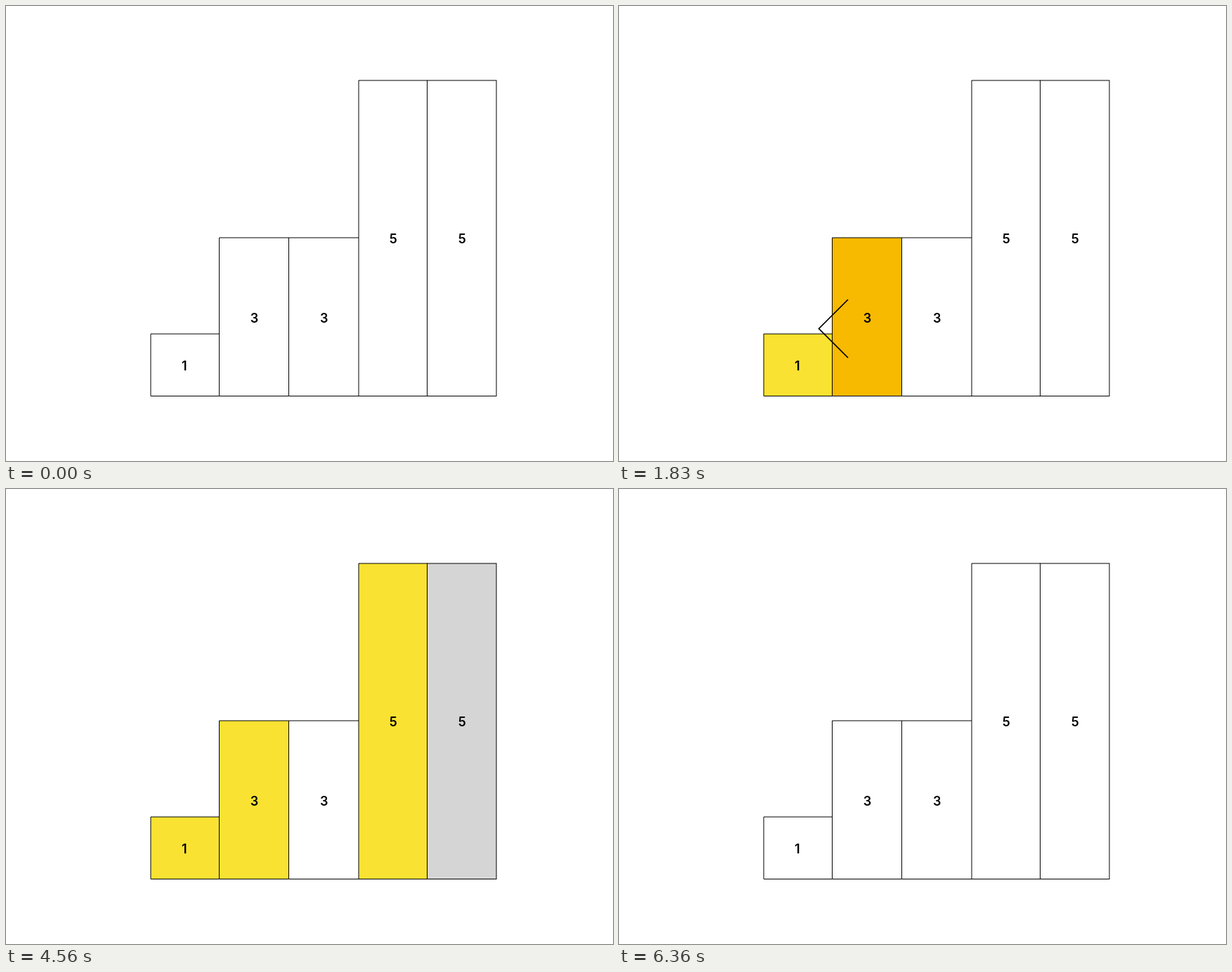
An HTML page for the animation above (6390 ms loop, 864x648 px).

```html
<!DOCTYPE html>
<html lang="en">
<head>
<meta charset="utf-8">
<title>Unique bars</title>
<style>
  html, body { margin: 0; width: 100%; height: 100%; overflow: hidden; background: #fff; }
  svg { display: block; width: 100vw; height: 100vh; }
  rect { stroke: #000; stroke-width: 1; }
  text { font: 600 18px Inter, "Liberation Sans", sans-serif; text-anchor: middle; }
  #arrow { fill: none; stroke: #000; stroke-width: 1.7; }
</style>
</head>
<body>
<svg id="stage" viewBox="0 0 864 648"></svg>
<script>
const LOOP = 6390;
const BASE = 555.5;
const COLORS = { w: '#ffffff', y: '#fae232', o: '#f8ba00', g: '#d5d5d5' };
const EDGES = [206, 303.5, 402.5, 502, 599.5, 698];
const VALUES = [1, 3, 3, 5, 5];

// Per value: top of the bar, label baseline and label shift from the middle.
const SHAPES = {
  1: { top: 467, y: 518.5, dx: -0.9 },
  3: { top: 330, y: 451, dx: 0.5 },
  5: { top: 106, y: 338.3, dx: 0.5 }
};

// One letter per bar; arrow is the tip of the "<" sign.
const STEPS = [
  { at: 0, bars: 'wwwww' },
  { at: 930, bars: 'ywwww' },
  { at: 1830, bars: 'yowww', arrow: [284.5, 459.5] },
  { at: 2730, bars: 'yygww' },
  { at: 3630, bars: 'yywow', arrow: [424.5, 324] },
  { at: 4560, bars: 'yywyg' },
  { at: 5460, bars: 'yywyw' },
  { at: 6360, bars: 'wwwww' }
];

const stage = document.getElementById('stage');

function add(tag, attrs, text = '') {
  const el = document.createElementNS('http://www.w3.org/2000/svg', tag);
  for (const key in attrs) el.setAttribute(key, attrs[key]);
  el.textContent = text;
  return stage.appendChild(el);
}

const bars = VALUES.map((v, i) => add('rect', {
  x: EDGES[i], y: SHAPES[v].top,
  width: EDGES[i + 1] - EDGES[i], height: BASE - SHAPES[v].top
}));
VALUES.forEach((v, i) => add('text', {
  x: (EDGES[i] + EDGES[i + 1]) / 2 + SHAPES[v].dx, y: SHAPES[v].y
}, v));
const arrow = add('path', { id: 'arrow', d: 'M41.5-41.5L0 0L41.5 41.5' });

// Shared edges would darken where they fall between pixels, so each
// bar leaves its right edge to the taller neighbour that starts there.
bars.slice(0, -1).forEach((bar, i) => {
  const w = EDGES[i + 1] - EDGES[i];
  const h = BASE - SHAPES[VALUES[i]].top;
  bar.setAttribute('stroke-dasharray', `${w} ${h} ${w + h}`);
  bar.setAttribute('stroke-dashoffset', 0);
});

function draw(time) {
  const t = time % LOOP;
  const step = STEPS.filter(s => s.at <= t).pop();
  bars.forEach((bar, i) => bar.setAttribute('fill', COLORS[step.bars[i]]));
  arrow.setAttribute('visibility', step.arrow ? 'visible' : 'hidden');
  if (step.arrow) arrow.setAttribute('transform', `translate(${step.arrow})`);
}

const start = performance.now();
function tick() {
  draw(Math.max(0, performance.now() - start));
  requestAnimationFrame(tick);
}
tick();
</script>
</body>
</html>
```
